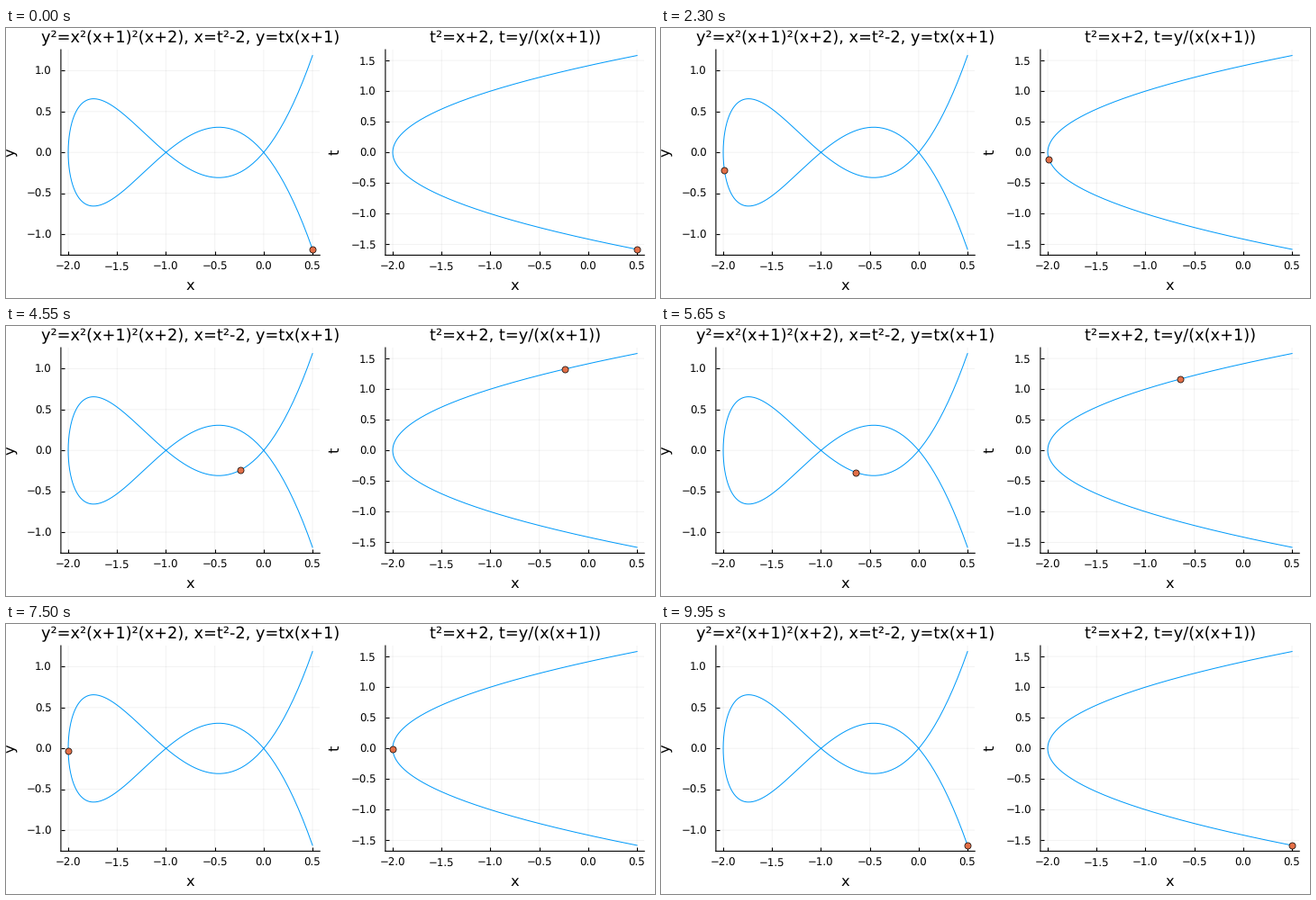
These frames come from a looping animation (720 px wide and 300 px high, 10 s). A matplotlib script:

```python
import numpy as np
import matplotlib.pyplot as plt
from matplotlib.animation import FuncAnimation

W, H, DPI = 720, 300, 100
PX = 72 / DPI  # points per pixel
STEPS = 100
T_MAX = np.sqrt(2.5)
BLUE, ORANGE = "#009AFA", "#E36F47"

plt.rcParams.update({
    "font.family": "DejaVu Sans",
    "text.hinting": "none",
    "path.snap": False,
})


def cubic_x(t):
    return t**2 - 2


def cubic_y(t):
    x = cubic_x(t)
    return t * x * (x + 1)


def widen(lo, hi):
    pad = 0.03 * (hi - lo)
    return lo - pad, hi + pad


def label(x, y, text, size, **kw):
    fig.text(x / W, 1 - y / H, text, fontsize=size * PX,
             ha="center", va="baseline", **kw)


def make_panel(left, title, y_name, height, y_ticks):
    """Draw one static panel and return its moving marker."""
    top, bottom, width = 24.1, 252.4, 287.3
    ax = fig.add_axes([left / W, 1 - bottom / H, width / W, (bottom - top) / H])
    t = np.linspace(-T_MAX, T_MAX, 400)
    ax.plot(cubic_x(t), height(t), color=BLUE, lw=PX, zorder=3)
    # A scatter keeps sub-pixel positions, unlike a line marker.
    dot = ax.scatter([0], [0], s=(7.1 * PX)**2, fc=ORANGE, ec="black",
                     lw=0.7 * PX, zorder=4, clip_on=False)

    ax.set_xlim(*widen(-2, 0.5))
    ax.set_ylim(*widen(height(t).min(), height(t).max()))
    ax.set_xticks(np.arange(-2, 0.6, 0.5))
    ax.set_yticks(y_ticks)
    ax.set_axisbelow(True)
    ax.grid(color="black", alpha=0.05, lw=PX)
    ax.spines[["top", "right"]].set_visible(False)
    ax.spines[["left", "bottom"]].set_linewidth(1.1 * PX)
    ax.tick_params(direction="in", length=4 * PX, width=1.1 * PX,
                   labelsize=11.8 * PX)
    ax.tick_params(axis="x", pad=7.6 * PX)
    ax.tick_params(axis="y", pad=10 * PX)

    middle = left + width / 2
    label(middle + 0.4, 16.6, title, 17.7)
    label(middle, 291.4, "x", 16.2)
    label(left - 51, 138.2, y_name, 16.2, rotation=90, rotation_mode="anchor")
    return dot


fig = plt.figure(figsize=(W / DPI, H / DPI), dpi=DPI, facecolor="white")
curve_dot = make_panel(60.9, "y²=x²(x+1)²(x+2), x=t²-2, y=tx(x+1)", "y",
                       cubic_y, np.arange(-1, 1.1, 0.5))
param_dot = make_panel(420.9, "t²=x+2, t=y/(x(x+1))", "t",
                       lambda t: t, np.arange(-1.5, 1.6, 0.5))


def update(frame):
    # Sweep up, then back; both end points are held for two frames.
    step = min(frame, 2 * STEPS - 1 - frame)
    t = T_MAX * (2 * step / (STEPS - 1) - 1)
    curve_dot.set_offsets([[cubic_x(t), cubic_y(t)]])
    param_dot.set_offsets([[cubic_x(t), t]])
    return curve_dot, param_dot


anim = FuncAnimation(fig, update, frames=2 * STEPS, interval=50,
                     repeat=True, repeat_delay=0, blit=False)
plt.show()
```
